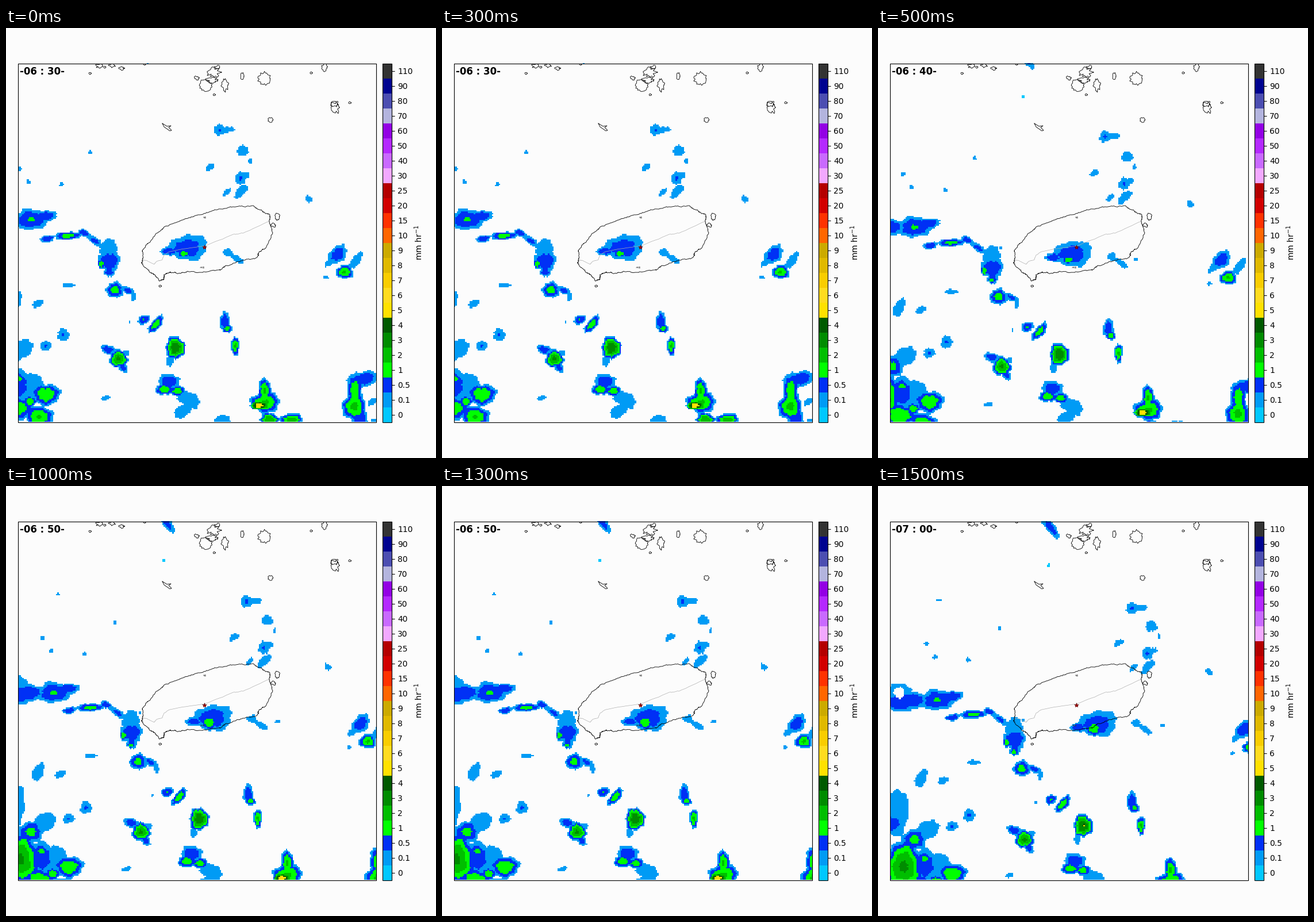
Recreate the animation shown at these times as a matplotlib script. Size 748 px wide and 748 px high, loop 2000 ms.

```python
import numpy as np
import matplotlib.pyplot as plt
from matplotlib.animation import FuncAnimation
from matplotlib.colors import to_rgb
from matplotlib.patches import Rectangle

SIZE, N = 748, 256
LEFT, RIGHT, TOP, BOTTOM = 21.5, 644.5, 61.5, 685.5
BACK = "#fcfcfc"
LABELS = "0 0.1 0.5 1 2 3 4 5 6 7 8 9 10 15 20 25 30 40 50 60 70 80 90 110".split()
TONES = """#00c8ff #009bf5 #0030f5 #00ff00 #00be00 #008c00 #005a00 #ffe100
#ffdc1f #f9cd00 #e0b900 #ccaa00 #ff6600 #ff3200 #d20000 #b40000 #f2a8ff #c969ff
#b429ff #9300e4 #b3b4de #4c4eb1 #000390 #333333""".split()
COLORS = np.array([to_rgb(c) for c in [BACK] + TONES])

X, Y = np.meshgrid(LEFT + (np.arange(N) + 0.5) * (RIGHT + 0.5 - LEFT) / N,
                   TOP + (np.arange(N) + 0.5) * (BOTTOM - TOP) / N)
cells = []


def rain(vx, vy, *blobs, since=0):
    """Add blobs (x, y, rx, ry, peak, tilt) that share one drift per step."""
    for blob in blobs:
        cells.append((vx, vy, since, blob))


def levels(x, y, rx, ry, peak=1, tilt=0):
    """Level inside a ragged ellipse, and the mask of its inside."""
    a = np.radians(tilt)
    dx, dy = X - x, Y - y
    u = (dx * np.cos(a) + dy * np.sin(a)) / rx
    v = (dy * np.cos(a) - dx * np.sin(a)) / ry
    angle = np.arctan2(v, u)
    ragged = 1 + 0.07 * np.sin(3 * angle + rx) + 0.06 * np.sin(7 * angle + ry)
    d2 = (u * u + v * v) * ragged ** 2
    return 1 + np.floor(peak * (1 - d2)).astype(int), d2 < 1


def rain_image(step):
    grid = np.full((N, N), -1)
    for vx, vy, since, (x, y, *form) in cells:
        if step >= since:
            level, inside = levels(x + vx * step, y + vy * step, *form)
            grid = np.where(inside, np.maximum(grid, level), grid)
            grid[inside & (level < 0)] = -1
    return COLORS[grid + 1]


# north
rain(23.3, 11.7, (372, 178, 10, 10, 1.1), (386, 177, 13, 5))
rain(21.3, 10.2, (147, 217, 3, 4), (412, 214, 10, 9), (425, 232, 3, 5),
     (355, 243, 9, 5, 1, -30))
rain(20.2, 9.9, (408, 262, 9, 11, 1.1), (418, 257, 7, 5), (409, 285, 15, 7, 1, -45),
     (384, 286, 9, 4, 1, -45), (24, 245, 4, 4), (39, 268, 4, 4), (97, 273, 4, 4))
rain(16.3, 8.6, (527, 298, 7, 5, 1, 45))
rain(22, 10, (235, 43, 23, 8, 1.5, 52))
rain(22.5, 9.7, (230, 110, 3, 3, -1), since=1)
rain(16.5, 10, (57, 169, 4, 2), since=2)

# west
rain(19.8, 13, (44, 334, 29, 18, 2.1), (70, 327, 19, 9, 2), (-22, 338, 27, 17, 2),
     (2, 334, 24, 15, 2), (-22, 318, 22, 13))
rain(19.8, 13, (-22, 321, 13, 14, -2), since=3)
rain(19.4, 12, (72, 367, 13, 6, 2, -10), (108, 362, 24, 7, 2.5, -3),
     (136, 357, 11, 6, 1.8, 20), (155, 371, 15, 6, 1.4, 35), (179, 384, 15, 17),
     (180, 406, 19, 18, 2), (180, 424, 9, 10, 1.8), (166, 411, 6, 9, 3))
rain(19.4, 12, (179, 427, 6, 6, 3), (195, 371, 3, 3), since=1)
rain(20.1, 12, (190, 456, 15, 14, 2.5), (212, 457, 13, 6, 1.4, 25), (222, 467, 4, 9))
rain(19.3, 11, (109, 448, 11, 4), (56, 480, 10, 6, 1, -25), (18, 476, 9, 17, 1, 25))
rain(20, 12.7, (-26, 530, 19, 41), (-36, 550, 18, 16, 2), (215, 513, 2, 3))

# south
rain(20.3, 12.6, (240, 508, 11, 8, 2.1, -20), (261, 516, 19, 8, 2.7, -50),
     (381, 511, 9, 17, 1.8), (385, 523, 9, 8, 2.6))
rain(19.6, 12.5, (399, 554, 7, 17, 3.2))
rain(20.7, 11.5, (295, 557, 17, 20, 5), (285, 581, 6, 8))
rain(20.7, 11.5, (296, 557, 5, 5, 7), since=3)
rain(19.7, 13.1, (178, 560, 13, 8, 1.8, 15), (196, 576, 16, 16, 4.2),
     (204, 591, 7, 10, 1.5, -30), (208, 566, 7, 5), (100, 534, 10, 11, 1.1),
     (70, 553, 10, 8, 1.1, -15))
rain(18.3, 11.3, (174, 644, 8, 4, 1, -15))
rain(19.5, 12.3, (284, 616, 18, 14, 2), (276, 629, 16, 10, 2.9),
     (298, 632, 14, 9, 2.8), (318, 647, 21, 13, 1, 25), (308, 667, 17, 10, 1, -30))

# south-west corner
rain(19.8, 13.2, (24, 562, 27, 15, 1, -35), (4, 576, 21, 18, 2.4))
rain(20, 12.5, (70, 638, 25, 19, 3), (-15, 625, 34, 45, 4.2), (18, 622, 27, 27, 2),
     (48, 627, 22, 24), (18, 662, 30, 22, 3), (58, 677, 24, 20, 3.1),
     (22, 611, 10, 8, 3), (42, 650, 12, 10, 3), (377, 684, 15, 10))

# south-east
rain(19.7, 12.6, (450, 631, 11, 22, 3.2), (451, 652, 26, 18, 3.2),
     (441, 657, 17, 8, 7.1), (458, 683, 17, 13, 4), (497, 682, 20, 11, 3.6))
rain(20, 12.5, (622, 611, 26, 13, 2, -10), (607, 632, 13, 33, 2.8),
     (606, 659, 21, 25, 3.3), (616, 680, 14, 15, 2), (638, 650, 10, 5, 1, -35),
     (641, 684, 6, 4))
rain(20, 10, (577, 394, 19, 13, 1.8, -45), (563, 409, 10, 5, 1, -30),
     (589, 425, 15, 12, 3.2), (609, 405, 17, 7, 1, -55), (557, 435, 4, 3))

# over the island
rain(21.8, 10.5, (316, 383, 33, 22, 1.7), (284, 389, 15, 8, 1.8),
     (335, 373, 15, 11), (310, 393, 11, 7, 3))
rain(21.8, 10.5, (310, 391, 14, 13, 3), since=2)
rain(21, 7.3, (386, 391, 8, 7), (402, 402, 14, 5, 1, 35))
rain(22.7, 7.7, (427, 395, 4, 3), since=1)

rng = np.random.default_rng(4)
fig = plt.figure(figsize=(SIZE / 100, SIZE / 100), dpi=100, facecolor=BACK)
ax = fig.add_axes([0, 0, 1, 1])
ax.axis("off")
picture = ax.imshow(rain_image(0), extent=(LEFT, RIGHT + 0.5, BOTTOM, TOP),
                    interpolation="nearest", aspect="auto", zorder=1)
ax.set_xlim(0, SIZE)
ax.set_ylim(SIZE, 0)
frame = Rectangle((LEFT, TOP), RIGHT - LEFT, BOTTOM - TOP, fc="none", ec="k",
                  lw=0.8, zorder=5)
ax.add_patch(frame)


def outline(points, amp=0.0, rounds=0, color="k", lw=0.6):
    """Draw a line, roughened by shifting the midpoints of its segments."""
    line = np.reshape(points, (-1, 2)).astype(float)
    for _ in range(rounds):
        mid = (line[1:] + line[:-1]) / 2
        mid += rng.uniform(-amp, amp, mid.shape)
        line = np.insert(line, np.arange(1, len(line)), mid, axis=0)
    art, = ax.plot(*line.T, color=color, lw=lw, zorder=3)
    art.set_clip_path(frame)


def islet(x, y, rx, ry, rough=0.2):
    n = int(8 + rx + ry)
    a = np.linspace(0, 2 * np.pi, n, endpoint=False)
    k = 1 + rng.uniform(-rough, rough, n)
    ring = np.column_stack([x + rx * k * np.cos(a), y + ry * k * np.sin(a)])
    outline(np.vstack([ring, ring[:1]]))


outline([237, 404, 237, 388, 246, 375, 265, 355, 277, 345, 306, 334, 328, 327,
         362, 317, 395, 311, 430, 309, 446, 319, 459, 325, 458, 337, 464, 356,
         450, 384, 440, 390, 437, 399, 408, 405, 381, 414, 372, 421, 340, 425,
         316, 423, 300, 427, 286, 424, 275, 429, 274, 437, 268, 440, 258, 429,
         250, 425, 236, 409, 237, 404], 0.9, 4)
outline([237, 405, 243, 404, 258, 411, 262, 406, 272, 403, 275, 395, 285, 389,
         345, 379, 395, 359, 412, 357, 458, 336], 0.6, 3, "#b0b0b0", 0.5)
outline([272, 166, 280, 171, 287, 170, 283, 173, 288, 178, 285, 179, 275, 172,
         272, 166])

islet(347, 100, 10, 10)
islet(361, 77, 10, 7, 0.4)
islet(359, 91, 9, 4, 0.5)
islet(381, 99, 6, 11, 0.35)
islet(449, 88, 10, 11)
islet(573, 138, 7, 9, 0.4)
islet(572, 133, 6, 4, 0.5)
islet(554, 69, 5, 6, 0.35)
islet(472, 328, 4, 6)
islet(411, 84, 3, 6)
islet(460, 160, 4, 4)
for x, y in [(332, 87), (368, 69), (162, 66), (184, 65), (201, 70), (464, 343)]:
    islet(x, y, 5, 3, 0.45)
for x, y in [(146, 79), (172, 68), (241, 63), (362, 116), (531, 78), (598, 130),
             (268, 449)]:
    islet(x, y, 2, 1.7)

ax.plot(345, 380.5, "*", color="#a00000", mec="#500000", mew=0.4, ms=6, zorder=4)
for x, y, name in [(346, 330, "제주"), (341, 417, "서귀포")]:
    ax.text(x, y, name, family="Noto Sans CJK JP", size=2.4, color="#333333",
            ha="center", va="center", zorder=4)

# colour scale
box_h = (BOTTOM - TOP) / len(LABELS)
for i, (label, color) in enumerate(zip(LABELS, TONES)):
    y = BOTTOM - (i + 1) * box_h
    mid = y + box_h / 2
    ax.add_patch(Rectangle((655, y), 16, box_h, fc=color, lw=0, zorder=2))
    ax.plot([671.5, 676], [mid, mid], "k", lw=0.8, solid_capstyle="butt")
    ax.text(681, mid, label, size=10, va="center_baseline")
ax.add_patch(Rectangle((655.5, TOP), 16, BOTTOM - TOP, fc="none", ec="k", lw=0.8,
                       zorder=5))
ax.text(718, 373.5, "mm hr$^{-1}$", size=10, rotation=90, ha="center", va="center")
clock = ax.text(24.5, 81, "", size=12, weight="bold", zorder=6)


def update(step):
    hour, minute = divmod(6 * 60 + 30 + 10 * step, 60)
    clock.set_text(f"-{hour:02d} : {minute:02d}-")
    picture.set_data(rain_image(step))
    return picture, clock


anim = FuncAnimation(fig, update, frames=4, interval=500, repeat=True,
                     init_func=lambda: update(0))
plt.show()
```
